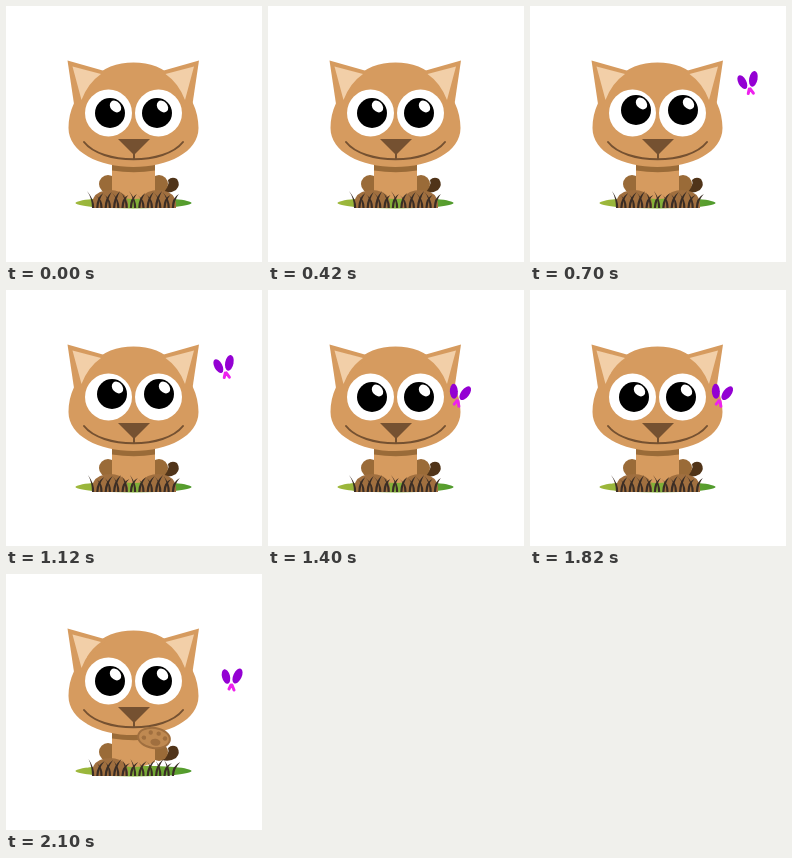
An HTML page that plays this animation: 256x256 px, repeating every 2.8 s.

```html
<!DOCTYPE html>
<html lang="en">
<head>
<meta charset="utf-8">
<title>Cat and butterfly</title>
<style>
  html, body { margin: 0; width: 100%; height: 100%; overflow: hidden; background: #fff; }
  svg { display: block; width: 100vw; height: 100vh; }
</style>
</head>
<body>
<svg viewBox="0 0 256 256">
  <defs>
    <linearGradient id="lawn">
      <stop offset="0" stop-color="#9fb83c"/>
      <stop offset=".55" stop-color="#7fae38"/>
      <stop offset="1" stop-color="#4f9a2c"/>
    </linearGradient>
    <g id="ear">
      <path fill="#d69b5f" d="M61.500 54.500L102 66L68 98Z"/>
      <path fill="#f2cfa8" d="M66.500 60.500L95 68Q82 77 75.500 94Z"/>
    </g>
    <g id="pupil">
      <circle r="15"/>
      <ellipse cx="5.500" cy="-6.500" rx="5" ry="6.500" fill="#fff" transform="rotate(-42 5.500 -6.500)"/>
    </g>
    <path id="foot" fill="#a06f3f" d="M-18 10Q-19-2-10-6Q0-10 10-6Q19-2 18 10Z"/>
  </defs>

  <ellipse cx="127.500" cy="197" rx="58" ry="5.500" fill="url(#lawn)"/>
  <path fill="#503419" d="M158 182Q164 180 162 174Q166 170 171 173Q175 179 170 184Q164 188 156 186Z"/>
  <g fill="#9a6b38">
    <circle cx="102" cy="178" r="9"/>
    <circle cx="153" cy="178" r="9"/>
  </g>
  <path fill="#d69b5f" d="M106 152H149V188Q128 198 106 188Z"/>
  <path fill="#9a6b38" d="M106 155H149V164.500Q128 168 106 164.500Z"/>

  <path fill="#d69b5f" d="M127.500 56.500C144 56.500 158 61 170 75C185 88 192.500 105 192.500 122C192.500 146 162 161 127.500 161S62.500 146 62.500 122C62.500 105 70 88 85 75C97 61 111 56.500 127.500 56.500Z"/>
  <use href="#ear"/>
  <use href="#ear" transform="translate(254.500) scale(-1 1)"/>
  <path fill="none" stroke="#755131" stroke-width="2" stroke-linecap="round" d="M78 136C96 159 159 159 177 136M128 147V153"/>
  <path fill="#755131" d="M112 133H144L128 149Z"/>
  <circle cx="102.500" cy="107" r="23.500" fill="#fff"/>
  <circle cx="152.500" cy="107" r="23.500" fill="#fff"/>
  <g id="gaze">
    <use href="#pupil" x="104" y="107"/>
    <use href="#pupil" x="151" y="107"/>
  </g>

  <use href="#foot" x="104" y="192"/>
  <use href="#foot" id="rightFoot" x="152" y="192"/>
  <g id="raisedPaw" transform="translate(148 164) rotate(8)">
    <ellipse rx="16" ry="10" fill="#bf8951" stroke="#a06f3f" stroke-width="2"/>
    <g fill="#a06f3f">
      <ellipse cx="2" cy="4" rx="5" ry="3.500"/>
      <circle cx="-10" cy="1" r="2.200"/>
      <circle cx="-4" cy="-5" r="2.200"/>
      <circle cx="4" cy="-5" r="2.200"/>
      <circle cx="11" cy="-1" r="2.200"/>
    </g>
  </g>
  <g id="blades" fill="#3a2d25"></g>

  <g id="butterfly">
    <g fill="#9400d3">
      <ellipse cx="-6" cy="-3.500" rx="4" ry="7.500" transform="rotate(-14 -6 -3.500)"/>
      <ellipse cx="5.500" cy="-4" rx="4.200" ry="8" transform="rotate(25 5.500 -4)"/>
    </g>
    <path fill="none" stroke="#ee22ee" stroke-width="3" stroke-linecap="round" d="M-1 5L-3 9M0 5L2 10"/>
  </g>
</svg>
<script>
  const HOLD = 700;
  const poses = [
    { gaze: [0, 0], sway: 0 },
    { gaze: [2, -3], sway: 1, fly: [219, 78, -14] },
    { gaze: [0, 0], sway: 0, fly: [191, 106, 12] },
    { gaze: [0, 0], sway: 1.5, fly: [226, 106, 0], raised: true }
  ];
  const el = id => document.getElementById(id);
  const show = (id, on) => el(id).setAttribute('display', on ? 'inline' : 'none');
  const move = (id, x, y, turn = 0) =>
    el(id).setAttribute('transform', `translate(${x} ${y}) rotate(${turn})`);

  // Tapered arcs that bend alternately left and right.
  function blade(i, sway) {
    const x = 87 + i * 4.2;
    const bend = i % 2 ? 6 : -6;
    const top = 185 + (i * 7 % 5);
    const tip = `${x + bend + sway} ${top}`;
    return `<path d="M${x - 1} 202Q${x - 1} 192 ${tip}Q${x + 1.6} 194 ${x + 1.2} 202Z"/>`;
  }

  let current = -1;
  function render(now) {
    const index = Math.floor(now / HOLD) % poses.length;
    if (index !== current) {
      current = index;
      const { gaze, sway, fly, raised } = poses[index];
      move('gaze', ...gaze);
      show('butterfly', fly);
      if (fly) move('butterfly', ...fly);
      show('raisedPaw', raised);
      show('rightFoot', !raised);
      el('blades').innerHTML = Array.from({ length: 20 }, (_, i) => blade(i, sway)).join('');
    }
    requestAnimationFrame(render);
  }
  render(performance.now());
</script>
</body>
</html>
```
